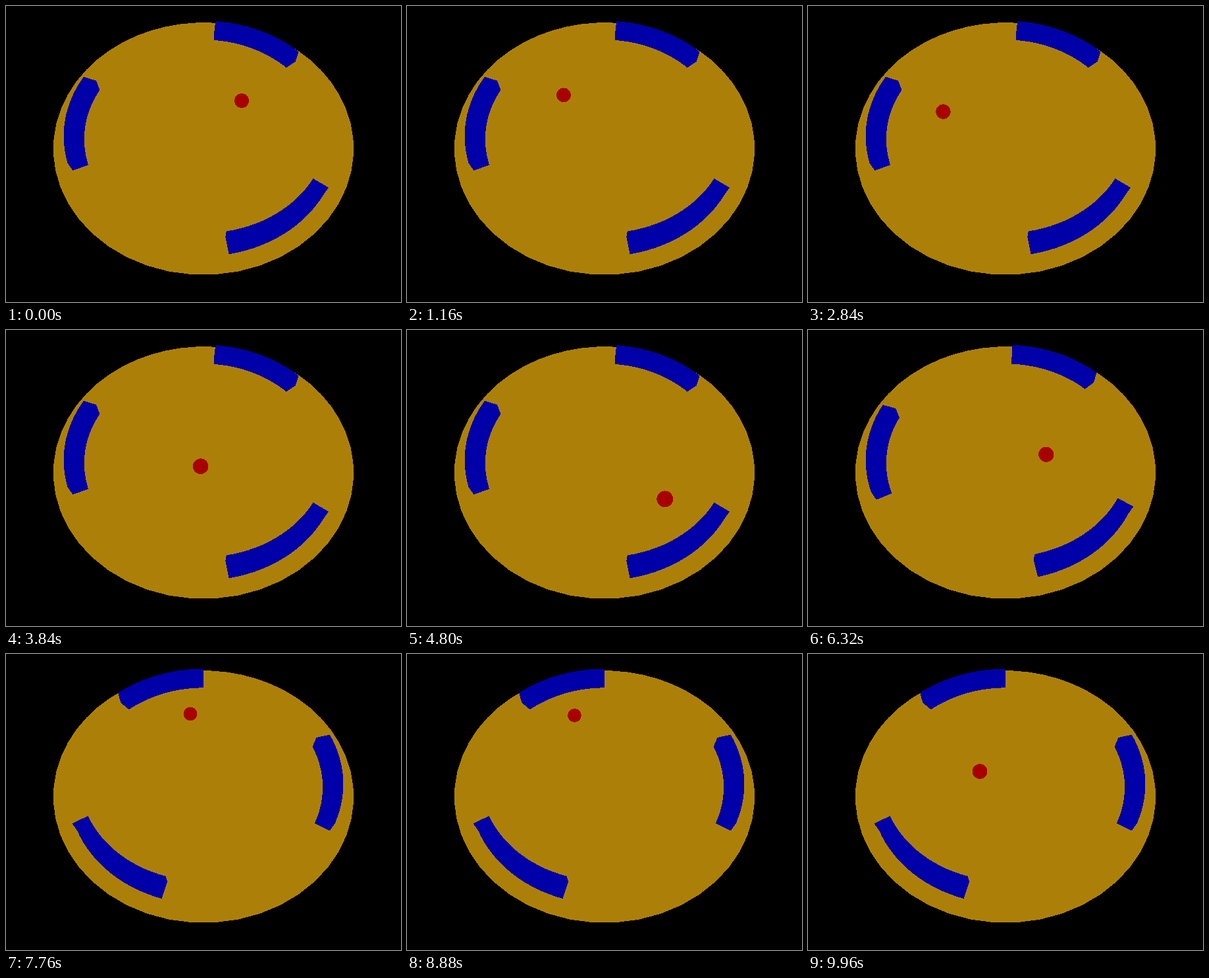
These frames come from a looping animation (600x450 px, 10 s). An HTML page:

```html
<!DOCTYPE html>
<html lang="en">
<head>
<meta charset="utf-8">
<title>Ball in a ring of walls</title>
<style>
  html, body { margin: 0; width: 100%; height: 100%; overflow: hidden; background: #000; }
  svg { display: block; width: 600px; height: 450px; }
</style>
</head>
<body>
<svg id="scene" viewBox="0 0 600 450" shape-rendering="crispEdges">
  <path id="floor" fill="#ac8008"/>
  <path id="walls" fill="#0000a8"/>
  <circle id="ball" fill="#a80000"/>
</svg>
<script>
const LOOP = 10000, STEP = 40;
const RAD = Math.PI / 180;
const FOCAL = 225 / Math.tan(22.5 * RAD);
const TILT = 30 * RAD;
const CAM = { y: -14, z: 20 };
const FLOOR = 10, INNER = 8, OUTER = 9, HEIGHT = 1, BALL = 0.5;

const [scene, floor, walls, ball] =
  ['scene', 'floor', 'walls', 'ball'].map(id => document.getElementById(id));

// Ball bounces: time, x, y on the floor plane
const bounces = [
  [0, 2.63, 1.5],
  [2090, -7.23, 2.4],
  [5230, 5.41, -5.27],
  [8345, -2.44, 7.05],
  [9960, -1.7, -0.4]
];

const turn = { start: 6160, end: 7280, from: 39, to: 90 };

function project(x, y, z) {
  const dy = y - CAM.y, dz = z - CAM.z;
  const depth = Math.sin(TILT) * dy - Math.cos(TILT) * dz;
  const scale = FOCAL / depth;
  const up = Math.cos(TILT) * dy + Math.sin(TILT) * dz;
  return { x: 300 + x * scale, y: 225 - up * scale, scale };
}

function polar(radius, deg, z) {
  const p = project(radius * Math.cos(deg * RAD), radius * Math.sin(deg * RAD), z);
  return p.x.toFixed(2) + ' ' + p.y.toFixed(2);
}

function arc(radius, start, sweep, z, parts) {
  return Array.from({ length: parts + 1 },
    (_, i) => polar(radius, start + sweep * i / parts, z));
}

const polygon = points => 'M' + points.join('L') + 'Z';

function wallPath(start) {
  const edge = (r, z) => arc(r, start, 45, z, 15);
  const band = (a, b) => polygon([...a, ...b.reverse()]);
  const end = deg => polygon([
    polar(INNER, deg, 0), polar(OUTER, deg, 0),
    polar(OUTER, deg, HEIGHT), polar(INNER, deg, HEIGHT)
  ]);
  return [
    band(edge(INNER, HEIGHT), edge(OUTER, HEIGHT)),
    band(edge(INNER, 0), edge(OUTER, 0)),
    band(edge(INNER, 0), edge(INNER, HEIGHT)),
    band(edge(OUTER, 0), edge(OUTER, HEIGHT)),
    end(start), end(start + 45)
  ];
}

// Every face gets the same winding so that overlaps never cancel out
function sameWinding(path) {
  const pts = path.slice(1, -1).split('L').map(p => p.split(' ').map(Number));
  const area = pts.reduce((sum, [x, y], i) => {
    const [nx, ny] = pts[(i + 1) % pts.length];
    return sum + x * ny - nx * y;
  }, 0);
  return area < 0 ? polygon(pts.reverse().map(p => p.join(' '))) : path;
}

function wallAngle(t) {
  const u = Math.min(1, Math.max(0, (t - turn.start) / (turn.end - turn.start)));
  return turn.from + (turn.to - turn.from) * (1 - Math.cos(Math.PI * u)) / 2;
}

function ballAt(t) {
  let i = 0;
  while (i < bounces.length - 2 && t >= bounces[i + 1][0]) i++;
  const [t0, x0, y0] = bounces[i], [t1, x1, y1] = bounces[i + 1];
  const u = (t - t0) / (t1 - t0);
  return { x: x0 + (x1 - x0) * u, y: y0 + (y1 - y0) * u };
}

let shownAngle;

function draw(t) {
  const angle = wallAngle(t);
  if (angle !== shownAngle) {
    walls.setAttribute('d', [0, 120, 240]
      .flatMap(offset => wallPath(angle + offset)).map(sameWinding).join(''));
    shownAngle = angle;
  }
  const pos = ballAt(t);
  const p = project(pos.x, pos.y, BALL);
  ball.setAttribute('cx', p.x);
  ball.setAttribute('cy', p.y);
  ball.setAttribute('r', BALL * p.scale);
  // Near walls hide the ball, far walls stand behind it
  scene.insertBefore(ball, pos.y < 0 ? walls : null);
}

floor.setAttribute('d', polygon(arc(FLOOR, 0, 360, 0, 50)));

const began = performance.now();
function tick() {
  const t = (performance.now() - began) % LOOP;
  draw(Math.floor(t / STEP) * STEP);
  requestAnimationFrame(tick);
}
tick();
</script>
</body>
</html>
```
